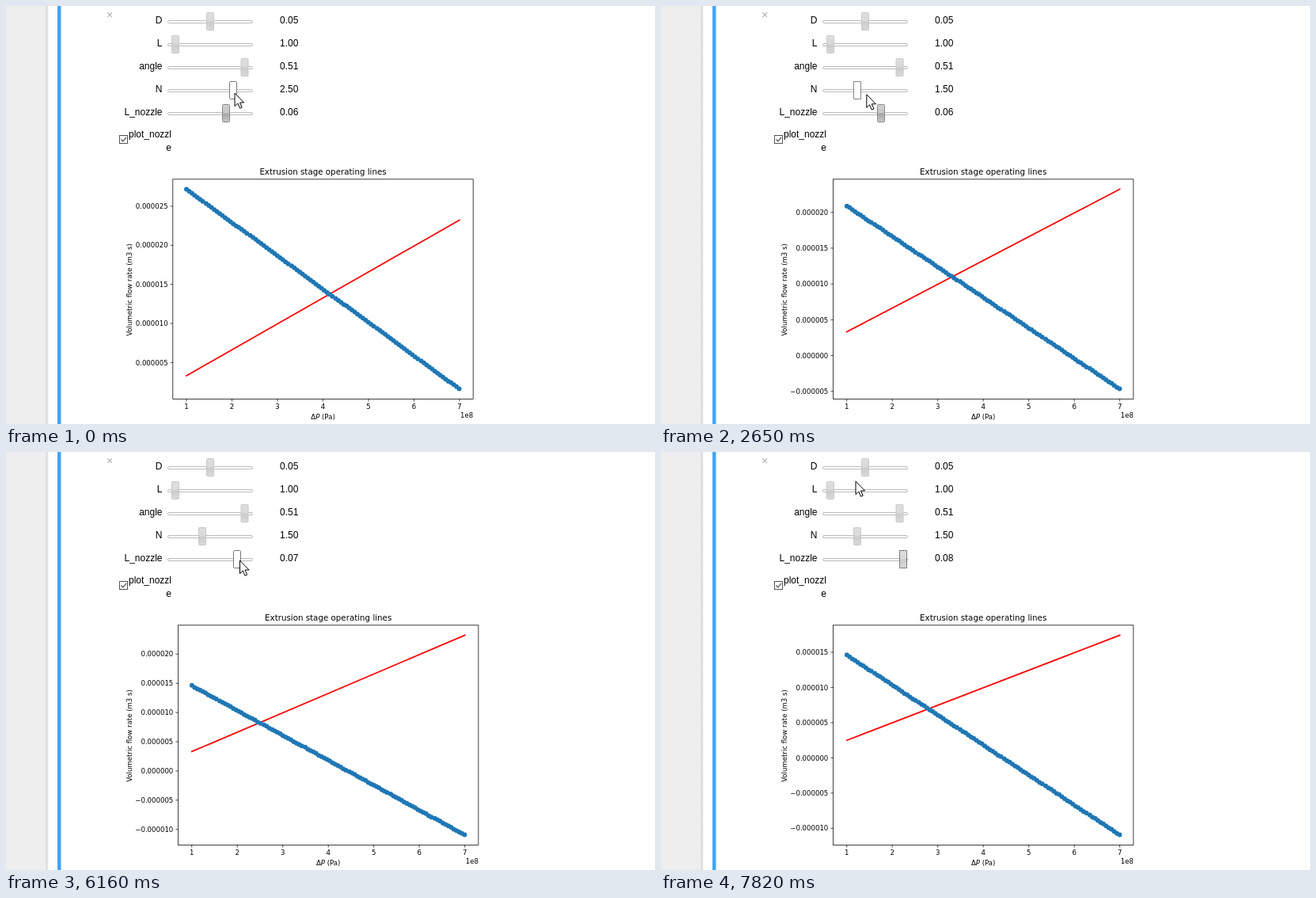
Recreate the animation shown at these times as an HTML page. Size 820x528 px, loop 8000 ms.

```html
<!DOCTYPE html>
<html lang="en">
<head>
<meta charset="utf-8">
<title>Operating lines</title>
<style>
  html, body { margin: 0; width: 100%; height: 100%; overflow: hidden; background: #fff; }
  svg { display: block; width: 820px; height: 528px; }
  .ui { font: 12px "Liberation Sans", Arial, sans-serif; fill: #000; }
  .plot { font: 8.57px "DejaVu Sans", sans-serif; fill: #000; }
  .title { font-size: 10.29px; }
  .end { text-anchor: end; }
  .mid { text-anchor: middle; }
  .axis { fill: none; stroke: #000; stroke-width: .75; }
</style>
</head>
<body>
<svg viewBox="0 0 820 528">
  <defs>
    <linearGradient id="edge"><stop offset="0" stop-color="#e8e8e8"/><stop offset=".45" stop-color="#d9d9d9"/><stop offset="1" stop-color="#fff"/></linearGradient>
    <linearGradient id="light" x2="0" y2="1">
      <stop offset="0" stop-color="#dedede"/><stop offset=".48" stop-color="#dadada"/>
      <stop offset=".52" stop-color="#cbcbcb"/><stop offset="1" stop-color="#dadada"/>
    </linearGradient>
    <linearGradient id="dark" x2="0" y2="1">
      <stop offset="0" stop-color="#d0d0d0"/><stop offset=".48" stop-color="#c6c6c6"/>
      <stop offset=".52" stop-color="#a6a6a6"/><stop offset="1" stop-color="#c8c8c8"/>
    </linearGradient>
  </defs>
  <rect width="50" height="528" fill="#eee"/>
  <rect x="50" width="4" height="528" fill="url(#edge)"/>
  <rect x="65" width="4.5" height="528" fill="#42a5f5"/>
  <text class="ui mid" x="131" y="16" style="font-size:14px;fill:#aaa">×</text>
  <g id="panel"></g>
  <rect x="143.5" y="163.5" width="10" height="10" fill="#fff" stroke="#555"/>
  <path d="M145.5 168.5l2.3 2.4 4.2-5" fill="none" stroke="#444" stroke-width="1.1"/>
  <text class="ui" x="155" y="166">plot_nozzl</text>
  <text class="ui end" x="209" y="183">e</text>
  <g id="chart"></g>
  <path id="pointer" d="M0 0V16.6L3.8 13L6.5 19.2L9.2 18L6.5 12H11.6Z" fill="#fff" stroke="#000" stroke-width="1" stroke-linejoin="round"/>
</svg>
<script>
const LOOP = 8000;
const $ = id => document.getElementById(id);
const panel = $('panel'), chart = $('chart'), pointer = $('pointer');

// pointer glides: first step, last step, steps, end x, end y
const glides = [
  [150, 430, 3, 281, 110],
  [960, 960, 1, 280, 111],
  [1260, 1670, 4, 267, 111],
  [2230, 2790, 5, 258, 112],
  [3210, 3350, 2, 254, 112],
  [4060, 4330, 3, 284, 143],
  [4610, 4610, 1, 281.5, 141.5],
  [4910, 5880, 8, 291, 139],
  [6030, 6160, 2, 295.5, 137],
  [6320, 6470, 2, 297, 136],
  [6620, 6920, 3, 302, 136],
  [7080, 7080, 1, 304, 135.5],
  [7520, 7820, 3, 246, 37]
];

// slider and chart changes
const changes = [
  [0, { speed: 2.5, len: .06, speedLook: 'white', lenLook: 'dark', plotSpeed: 2.5, plotLen: .06 }],
  [290, { speed: 2, speedLook: 'white dots' }],
  [830, { plotSpeed: 2 }],
  [1260, { speedLook: 'light dots' }],
  [1670, { speedLook: 'white dots' }],
  [2510, { speed: 1.5 }],
  [2930, { plotSpeed: 1.5 }],
  [3780, { speedLook: 'light dots' }],
  [4910, { speedLook: 'light', lenLook: 'white' }],
  [6030, { len: .07 }],
  [6470, { plotLen: .07 }],
  [7080, { len: .08, lenLook: 'white dots' }],
  [7520, { plotLen: .08, lenLook: 'light dots' }]
];

const text = (x, y, s, cls, extra = '') => `<text x="${x}" y="${y}" class="${cls}" ${extra}>${s}</text>`;
const line = (x1, y1, x2, y2) => `<path class="axis" d="M${x1} ${y1}L${x2} ${y2}"/>`;

function slider(row, name, value, x, look) {
  const cy = 20 + 29 * row, [tone, dots] = look.split(' ');
  const fill = tone === 'white' ? '#fff' : `url(#${tone})`;
  const stroke = dots ? '#222' : { white: '#777', dark: '#888', light: '#c8c8c8' }[tone];
  return text(197.5, cy + 2, name, 'ui end') + text(346, cy + 2, value.toFixed(2), 'ui') +
    `<rect x="204.5" y="${cy - 1.5}" width="107" height="3" rx="1.5" fill="#fff" stroke="#bbb"/>` +
    `<rect x="${x - 4.5}" y="${cy - 11.5}" width="9" height="22" rx="${dots ? 0 : 1}" fill="${fill}" stroke="${stroke}"` +
    `${dots ? ' stroke-dasharray="1.2 1"' : ''}/>`;
}

function drawPanel(s) {
  panel.innerHTML =
    slider(0, 'D', .05, 258, 'light') +
    slider(1, 'L', 1, 214, 'light') +
    slider(2, 'angle', .51, 301.5, 'light') +
    slider(3, 'N', s.speed, Math.round(189 + 39 * s.speed), s.speedLook) +
    slider(4, 'L_nozzle', s.len, Math.round(194 + 1400 * s.len), s.lenLook);
}

// flow rates in 1e-6 m3/s, pressure in 1e8 Pa
function drawChart({ plotSpeed, plotLen }) {
  const screw = p => 12.575 * plotSpeed - 4.26 * p;
  const die = p => .19914 / plotLen * p;
  const min = Math.min(screw(7), die(1)), max = Math.max(screw(1), die(7));
  const pad = (max - min) * .05, lo = min - pad, hi = max + pad;
  const left = lo < -5 || min < 0 ? 217.5 : 210.8, width = 379.4, right = left + width;
  const top = 218.8, bottom = 496.4, centre = left + width / 2;
  const X = p => left + width * (p - .7) / 6.6;
  const Y = q => bottom - (q - lo) / (hi - lo) * (bottom - top);
  const snap = v => Math.round(v * 7 / 6) * 6 / 7;

  let out = `<path d="M${X(1)} ${Y(die(1))}L${X(7)} ${Y(die(7))}" stroke="#f00" stroke-width="1.75" stroke-linecap="square"/>`;
  for (let i = 0; i < 100; i++) {
    const p = 1 + 6 * i / 99;
    out += `<circle cx="${snap(X(p)).toFixed(2)}" cy="${snap(Y(screw(p))).toFixed(2)}" r="3" fill="#1f77b4"/>`;
  }
  out += `<rect class="axis" x="${left}" y="${top}" width="${width}" height="${bottom - top}"/>`;
  for (let p = 1; p <= 7; p++) {
    out += line(X(p), bottom, X(p), bottom + 3) + text(X(p), 509.2, p, 'plot mid');
  }
  for (let q = Math.ceil(lo / 5) * 5; q <= hi; q += 5) {
    const label = (q < 0 ? '−' : '') + (Math.abs(q) / 1e6).toFixed(6);
    out += line(left - 3, Y(q), left, Y(q)) + text(left - 6.2, Y(q) + 3.2, label, 'plot end');
  }
  out += text(centre, 213.4, 'Extrusion stage operating lines', 'plot title mid') +
    text(centre, 522.4, 'Δ<tspan font-style="italic">P</tspan> (Pa)', 'plot mid') +
    text(right, 520.4, '1e8', 'plot end') +
    text(0, 0, 'Volumetric flow rate (m3 s)', 'plot mid', 'transform="translate(158.8 358.5) rotate(-90)"');
  chart.innerHTML = out;
}

function pointerAt(t) {
  let x = 289, y = 110;
  for (const [from, to, n, ex, ey] of glides) {
    if (t < from) break;
    const gap = n > 1 ? (to - from) / (n - 1) : 1;
    const k = Math.min(n, Math.floor((t - from) / gap + 1e-6) + 1) / n;
    x += (ex - x) * k;
    y += (ey - y) * k;
  }
  return [x, y];
}

let shown = -1;
function draw(now) {
  const t = now % LOOP;
  const count = changes.filter(c => c[0] <= t).length;
  if (count !== shown) {
    const state = Object.assign({}, ...changes.slice(0, count).map(c => c[1]));
    drawPanel(state);
    drawChart(state);
    shown = count;
  }
  const [x, y] = pointerAt(t);
  pointer.setAttribute('transform', `translate(${x.toFixed(2)} ${y.toFixed(2)})`);
}

const start = performance.now();
function tick() {
  draw(performance.now() - start);
  requestAnimationFrame(tick);
}
tick();
</script>
</body>
</html>
```
